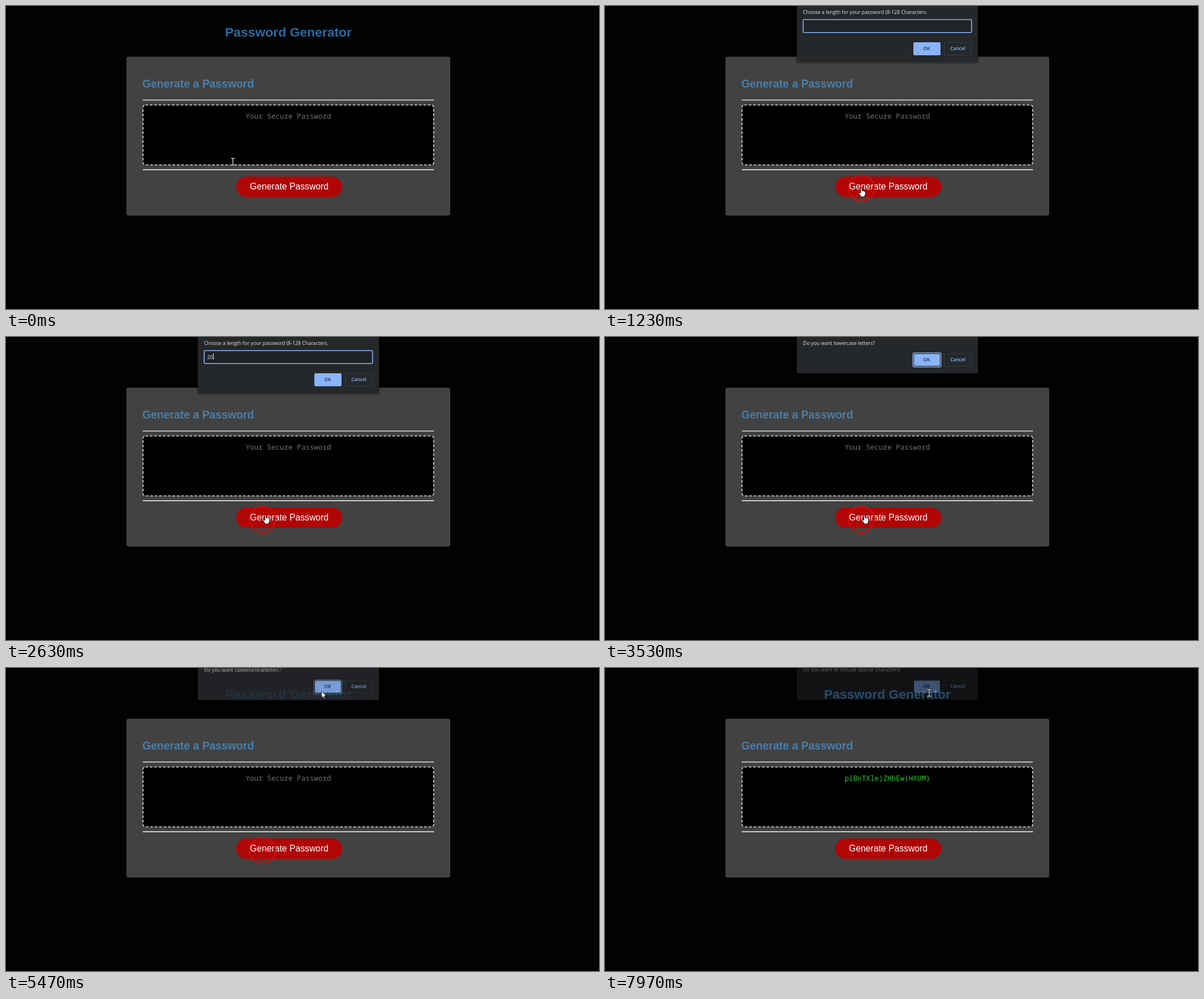
Recreate the animation shown at these times as an HTML page. Size 1048 px wide and 535 px high, loop 8000 ms.

```html
<!DOCTYPE html>
<html lang="en">
<head>
<meta charset="utf-8">
<title>Password Generator</title>
<style>
  html, body { margin: 0; width: 100%; height: 100%; overflow: hidden; background: #020203; }
  svg { position: absolute; left: 0; top: 0; }
  .sans { font-family: "Liberation Sans", Arial, sans-serif; }
  .mono { font: 12.6px "Noto Sans Mono", "DejaVu Sans Mono", monospace; }
  .dialog { font: 8.8px "Open Sans", "Noto Sans", sans-serif; fill: #e4e6e9; filter: drop-shadow(0 1px 2px #0008); }
  .label { font-size: 8.3px; font-weight: 600; text-anchor: middle; }
</style>
</head>
<body>
<svg width="1048" height="535" viewBox="0 0 1048 535">
  <rect x="212.8" y="89.5" width="572.3" height="280.4" rx="4" fill="#424242"/>
  <path d="M241.7 166H756.3M241.7 289.2H756.3" stroke="#dededa" stroke-width="1.7"/>
  <rect x="242.2" y="174.7" width="513.6" height="105.8" rx="4" fill="#000" stroke="#d8d8d2" stroke-width="1.6" stroke-dasharray="4.8 3"/>
  <rect x="406.7" y="301" width="187.6" height="36" rx="18" fill="#b00606"/>
  <g class="sans">
    <text x="499" y="53.5" font-size="22.9" font-weight="700" text-anchor="middle" fill="#286aa4">Password Generator</text>
    <text x="241" y="143.5" font-size="19.4" font-weight="700" fill="#4a7ea8">Generate a Password</text>
    <text x="500.5" y="324" font-size="15.75" text-anchor="middle" fill="#fff">Generate Password</text>
  </g>
  <text id="password" class="mono" x="499" y="199" text-anchor="middle"></text>
  <circle id="ring" cx="453" cy="322" r="23" fill="#f00" fill-opacity=".06" stroke="#d40c0c" stroke-width="2"/>
  <g id="dialogs"></g>
  <g id="cursor">
    <g id="beam" fill="none">
      <path d="M-3-6h2l1 1 1-1h2M0-5V5M-3 6h2l1-1 1 1h2" stroke="#000" stroke-width="2.8"/>
      <path d="M-3-6h2l1 1 1-1h2M0-5V5M-3 6h2l1-1 1 1h2" stroke="#d4d4d4" stroke-width="1.4"/>
    </g>
    <path id="arrow" d="M0 0V11.6L2.7 9.1 4.5 13.3 6.5 12.4 4.7 8.3H8.3Z" fill="#fff" stroke="#000" stroke-width=".7"/>
    <path id="hand" d="M-1.2.8Q0-.8 1.2.8V5.4Q2.6 4.4 3.3 5.8 4.7 4.9 5.3 6.4 7.2 5.9 7.2 8V11Q7 13 5.8 14.2V16H-1.2V14.4L-4.3 9.8Q-5 7.8-3.2 8.2L-1.2 10Z" fill="#fff" stroke="#000" stroke-width=".9"/>
  </g>
</svg>
<script>
const LOOP = 8000, FADE = 200, SLIDE = 14;
const CLICK = 380, DONE = 7860;
const $ = id => document.getElementById(id);
const clamp = v => Math.max(0, Math.min(1, v));

// Each dialog slides in at "from" and back out at "to".
const dialogs = [
  { from: 414, to: 2950, text: "Choose a length for your password (8-128 Characters.", input: true },
  { from: 2950, to: 4250, text: "Do you want lowercase letters?" },
  { from: 4250, to: 5360, text: "Do you want Uppercase letters?" },
  { from: 5370, to: 6684, text: "Do you want numeric characters?" },
  { from: 6684, to: DONE, text: "Do you want to include special characters?" }
];

// Pointer stops: time, x, y
const stops = [
  [60, 401, 275], [340, 453, 321], [1720, 453, 321], [1980, 458.5, 314],
  [3650, 458.5, 314], [4150, 564, 42], [4700, 564, 42], [5200, 557.5, 41],
  [5900, 557.5, 41], [6500, 574, 42], [6760, 602, 43], [7100, 602, 43], [7600, 573, 44]
];

function dialogMarkup({ text, input }) {
  const top = input ? 64 : 29;
  const field = input ? `
    <rect x="350.3" y="24" width="297.4" height="22.7" rx="1.5" fill="#1f2226" stroke="#8ab4f8" stroke-width="1.6"/>
    <text id="typed" x="355.5" y="38.5"></text>
    <rect id="caret" y="29" width="1" height="11"/>` : "";
  const focus = input ? "" : `
    <rect class="focus" x="544.2" y="28.2" width="49.6" height="24.6" rx="2.5" fill="#20242a" stroke="#a3c5fa" stroke-width="1.3"/>`;
  const inset = input ? 0 : 1;
  return `<g class="dialog">
    <rect x="339" y="-20" width="320" height="${top + 55}" rx="2" fill="#25282b"/>
    <text x="350" y="14">${text}</text>${field}${focus}
    <rect x="${545 + inset}" y="${top + inset}" width="${48 - 2 * inset}" height="${23 - 2 * inset}" rx="2" fill="#8ab4f8"/>
    <text class="label" x="568.5" y="${top + 14.2}" fill="#202f4a">OK</text>
    <rect x="599.5" y="${top + .5}" width="48" height="22" rx="2" fill="none" stroke="#373b40"/>
    <text class="label" x="623.5" y="${top + 14.2}" fill="#8ab4f8">Cancel</text>
  </g>`;
}

// Later dialogs lie beneath the one that is leaving.
$("dialogs").innerHTML = [...dialogs].reverse().map(dialogMarkup).join("");
[...$("dialogs").children].reverse().forEach((node, i) => {
  dialogs[i].node = node;
  dialogs[i].focus = node.querySelector(".focus");
});

function show(node, visible) {
  node.setAttribute("visibility", visible ? "visible" : "hidden");
}

function pointerAt(t) {
  const next = stops.findIndex(stop => stop[0] > t);
  if (next === 0) return stops[0].slice(1);
  if (next < 0) return stops[stops.length - 1].slice(1);
  const [t0, x0, y0] = stops[next - 1], [t1, x1, y1] = stops[next];
  const p = (t - t0) / (t1 - t0), e = p * p * (3 - 2 * p);
  return [x0 + (x1 - x0) * e, y0 + (y1 - y0) * e];
}

function pointerKind(t, y) {
  if (t < 2000 && y < 282 || t > 7930) return "beam";
  return y > 301 && y < 337 ? "hand" : "arrow";
}

function draw(t) {
  for (const { from, to, node, focus } of dialogs) {
    const enter = clamp((t - from) / FADE), leave = clamp((t - to) / FADE);
    node.style.opacity = (1 - (1 - enter) ** 2) * (1 - leave);
    node.setAttribute("transform", `translate(0 ${-SLIDE * (1 - enter + leave)})`);
    if (focus) show(focus, t < to);
  }

  const typed = "20".slice(0, (t > 2300) + (t > 2520));
  $("typed").textContent = typed;
  $("caret").setAttribute("x", 356 + typed.length * 5.03);
  const blinkStart = typed ? 2520 : 500;
  show($("caret"), t < 2950 && (t < blinkStart || (t - blinkStart) % 1060 < 530));

  const done = t >= DONE;
  $("password").textContent = done ? "piBnTXle)ZHbEw(HXUM)" : "Your Secure Password";
  $("password").setAttribute("fill", done ? "#2bc92b" : "#70706c");
  show($("ring"), t >= CLICK && !done);

  const [x, y] = pointerAt(t), kind = pointerKind(t, y);
  $("cursor").setAttribute("transform", `translate(${x} ${y})`);
  for (const id of ["beam", "arrow", "hand"]) show($(id), id === kind);
}

function frame() {
  draw(performance.now() % LOOP);
  requestAnimationFrame(frame);
}
frame();
</script>
</body>
</html>
```
